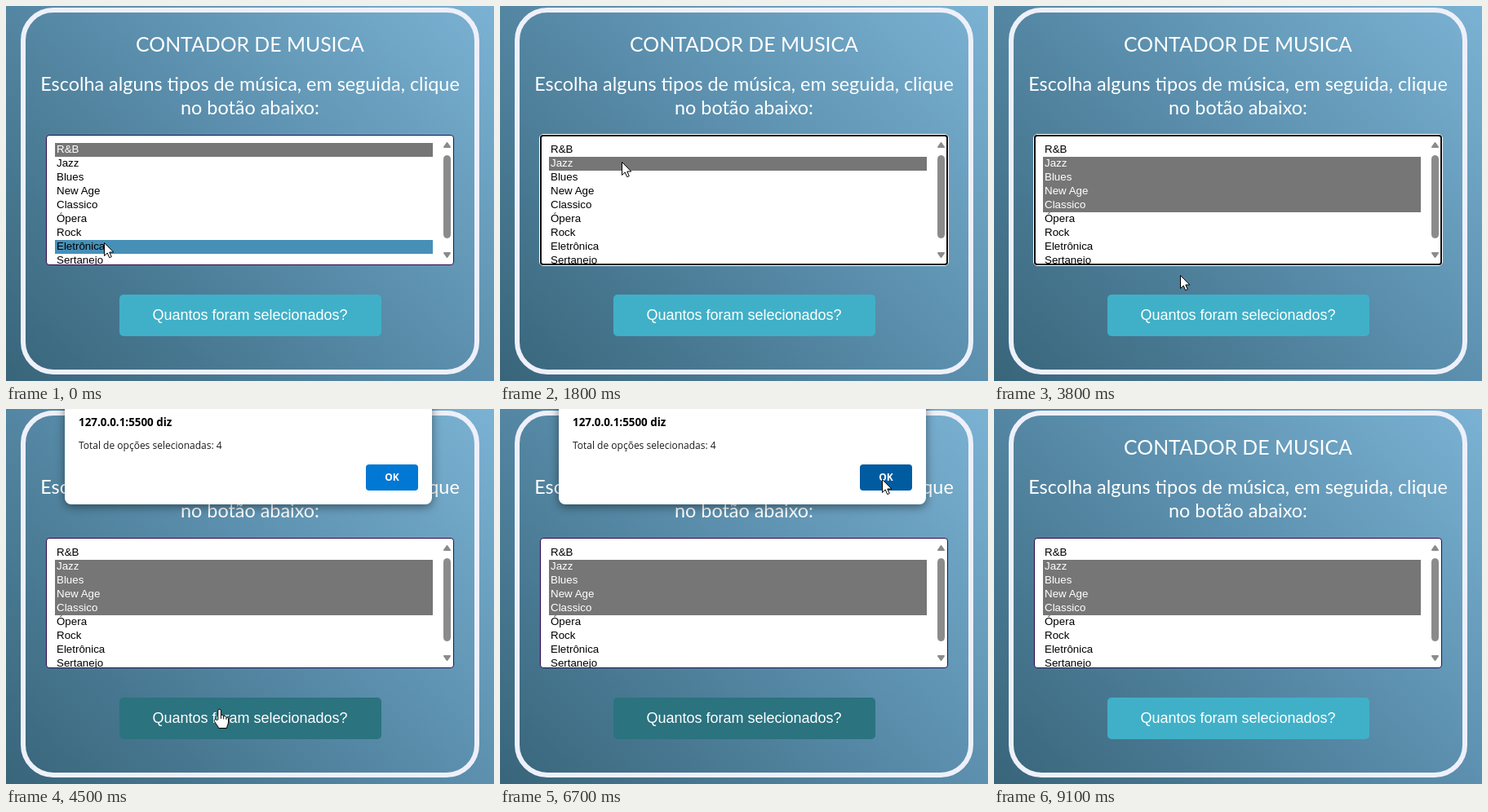
An HTML page that plays this animation: 598 by 460 pixels, repeating every 9.2 s.

```html
<!DOCTYPE html>
<html lang="pt">
<head>
<meta charset="utf-8">
<title>Contador</title>
<style>
html, body { margin: 0; width: 100%; height: 100%; overflow: hidden; }
body { position: relative; background: linear-gradient(45deg, #38657a, #5b8fad 55%, #7bb2d3); }
svg { position: absolute; left: 0; top: 0; }
.head { font-family: Lato, "Open Sans", sans-serif; fill: #fff; text-anchor: middle; }
.list { font: 13.333px "Liberation Sans", Arial, sans-serif; }
.btn { font: 18px "Liberation Sans", Arial, sans-serif; fill: #fff; text-anchor: middle; }
.dlg { font-family: "Open Sans", "Noto Sans", sans-serif; }
#dialog { filter: drop-shadow(0 3px 6px rgba(0, 0, 0, .45)); }
</style>
</head>
<body>
<svg width="598" height="460" viewBox="0 0 598 460">
  <defs>
    <clipPath id="view"><rect id="clip" x="51" y="159" width="497" height="158"/></clipPath>
  </defs>
  <rect x="21" y="5" width="556" height="444" rx="37" fill="none" stroke="#eef0fa" stroke-width="6"/>
  <g class="head">
    <text x="299" y="56" font-size="24.8">CONTADOR DE MUSICA</text>
    <text x="299" y="104" font-size="23.4">Escolha alguns tipos de música, em seguida, clique</text>
    <text x="299" y="133" font-size="23.4">no botão abaixo:</text>
  </g>

  <rect x="49.5" y="158.5" width="499" height="159" rx="3.5" fill="#fff" stroke="#2b0a4e"/>
  <g id="rows" class="list" clip-path="url(#view)"></g>
  <g fill="#8b8b8b" stroke="#8b8b8b" stroke-linejoin="round">
    <rect x="536.5" y="183.5" width="8" height="101" rx="4"/>
    <path stroke-width="2" d="M540.5 168l3.5 5h-7zM540.5 308l3.5-5h-7z"/>
  </g>
  <g id="ring" fill="none">
    <rect x="48.5" y="157.5" width="501" height="161" rx="4.5" stroke="#fff"/>
    <rect x="50" y="159" width="498" height="158" rx="3" stroke="#101010" stroke-width="2"/>
  </g>

  <rect id="button" x="139" y="354" width="321" height="51" rx="5"/>
  <text class="btn" x="299" y="385">Quantos foram selecionados?</text>

  <g id="dialog" class="dlg">
    <path d="M72-20H522V109a8 8 0 0 1-8 8H80a8 8 0 0 1-8-8z" fill="#fff"/>
    <text x="89" y="21" font-size="13.4" font-weight="700">127.0.0.1:5500 diz</text>
    <text x="89" y="49" font-size="12" fill="#1b1b1b">Total de opções selecionadas: 4</text>
    <rect id="ok" x="441" y="68" width="64" height="32" rx="4"/>
    <text x="473" y="88" font-size="12" font-weight="700" fill="#fff" text-anchor="middle">OK</text>
  </g>

  <g id="cursor" fill="#fff" stroke="#000" stroke-linejoin="round">
    <path id="arrow" d="M.5.5V16.5L4.2 13 6.7 18.7 9.3 17.6 6.8 12H11.8Z"/>
    <path id="hand" d="M-2.2 11V0a1.8 1.8 0 0 1 3.6 0V6.5a1.7 1.7 0 0 1 3.3.4v.6a1.7 1.7 0 0 1 3.2.6v.7a1.5 1.5 0 0 1 2.6 1V14c0 3-1.8 4.5-2 7.5H-1.5c-.6-3-3.500-5-5-8.300-1-2 1-3.200 2.600-1.600z M1.400 6.500V10 M4.700 7.500V10.500 M7.900 8.800V11"/>
  </g>
</svg>
<script>
const LOOP = 9200, STEP = 100, TOP = 168, ROW = 17;
const PRESS = 1700, RELEASE = 3200, CLICK = 4300, CLOSE = 6900;
const names = ["R&B", "Jazz", "Blues", "New Age", "Classico", "Ópera", "Rock", "Eletrônica", "Sertanejo"];
// cursor stops: time, x, y
const path = [
  [0, 120, 290], [200, 121, 287], [800, 130, 226], [1500, 149, 191], [2000, 149, 191],
  [2800, 154, 242], [3300, 154, 242], [4100, 262, 370], [4900, 262, 370],
  [6300, 468, 86], [7900, 468, 86], [8600, 612, 130], [LOOP, 612, 130]
];
const $ = id => document.getElementById(id);

function add(tag, attrs) {
  const el = document.createElementNS("http://www.w3.org/2000/svg", tag);
  for (const k in attrs) el.setAttribute(k, attrs[k]);
  return $("rows").appendChild(el);
}

const rows = names.map((name, i) => {
  const y = TOP + i * ROW;
  const bar = add("rect", { x: 60, y, width: 463, height: ROW });
  const label = add("text", { x: 62, y: y + 12 });
  label.textContent = name;
  return { bar, label };
});

function cursorAt(t) {
  const i = path.findIndex(p => p[0] > t);
  const [t0, x0, y0] = path[i - 1], [t1, x1, y1] = path[i];
  const u = (t - t0) / (t1 - t0), e = u * u * (3 - 2 * u);
  return [x0 + (x1 - x0) * e, y0 + (y1 - y0) * e];
}

const inside = (x, y, l, t, r, b) => x >= l && x < r && y >= t && y < b;
const show = (id, on) => $(id).setAttribute("visibility", on ? "visible" : "hidden");

function draw(t) {
  const [x, y] = cursorAt(t);
  const open = t >= CLICK && t < CLOSE;
  const focus = t >= PRESS && t < CLICK;
  const over = !open && inside(x, y, 60, TOP, 523, 317) ? Math.floor((y - TOP) / ROW) : -1;
  const first = t < PRESS ? 0 : 1;
  const last = t < PRESS ? 0 : t < RELEASE ? Math.max(1, over) : 4;

  rows.forEach(({ bar, label }, i) => {
    const picked = i >= first && i <= last;
    bar.setAttribute("fill", picked ? "#767676" : i === over ? "#4690b8" : "#fff");
    label.setAttribute("fill", picked ? "#fff" : "#000");
  });
  $("clip").setAttribute("height", focus ? 157 : 158);
  show("ring", focus);

  const onButton = inside(x, y, 139, 354, 460, 405);
  $("button").setAttribute("fill", open || onButton ? "#2a737f" : "#40b0c8");
  show("dialog", open);
  $("ok").setAttribute("fill", inside(x, y, 441, 68, 505, 100) ? "#005ba1" : "#0078d4");

  show("hand", onButton);
  show("arrow", !onButton);
  $("cursor").setAttribute("transform", `translate(${Math.round(x)} ${Math.round(y)})`);
}

const start = performance.now();
function tick() {
  const t = (performance.now() - start) % LOOP;
  draw(Math.floor(t / STEP) * STEP);
  requestAnimationFrame(tick);
}
tick();
</script>
</body>
</html>
```
